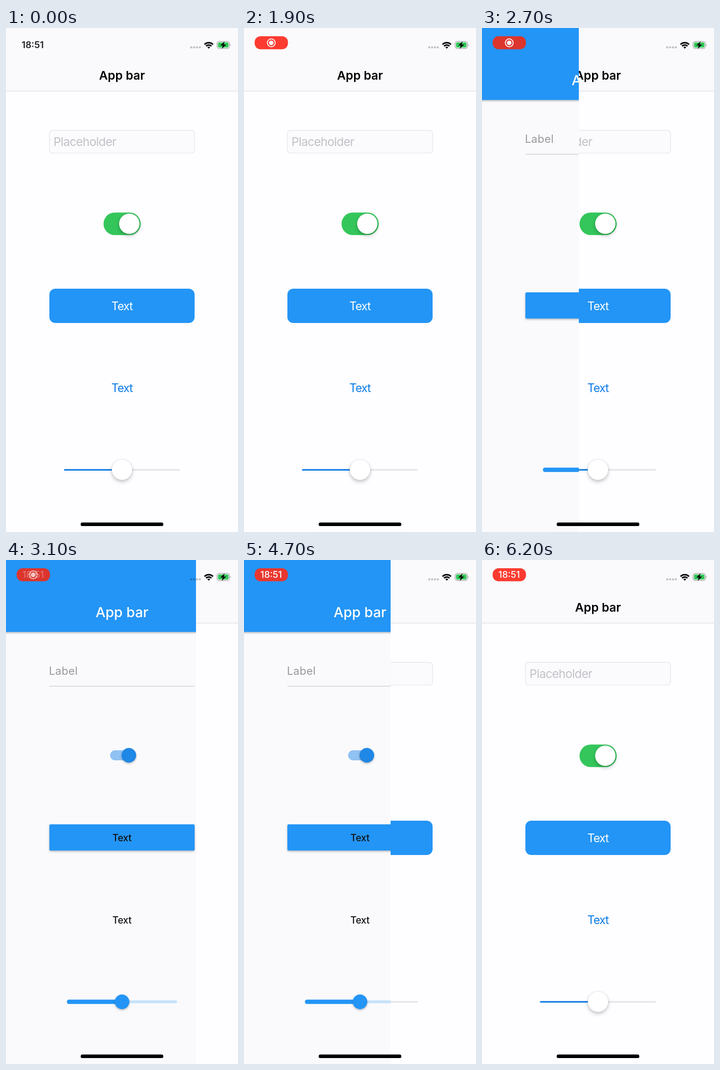
Animation, 508 px wide and 1102 px high, one loop 6300 ms. Source, as an HTML page:

```html
<!DOCTYPE html>
<html lang="en">
<head>
<meta charset="utf-8">
<title>Control styles</title>
<style>
html, body { margin: 0; width: 100%; height: 100%; overflow: hidden; background: #fefdff; }
svg { display: block; width: 100%; height: 100%; font-family: Inter, Roboto, sans-serif; }
.mid { text-anchor: middle; }
.knob { fill: #fff; filter: drop-shadow(0 4px 4px rgba(0,0,0,.2)) drop-shadow(0 0 1px rgba(0,0,0,.18)); }
.raised { filter: drop-shadow(0 2px 2px rgba(0,0,0,.28)); }
.title { font-size: 26.2px; font-weight: 600; }
.action { font-size: 25px; letter-spacing: -1px; }
.bigTitle { font-size: 30.5px; font-weight: 500; fill: #fff; }
.caption { font-size: 20.8px; font-weight: 500; letter-spacing: -.2px; fill: #111; }
.clock { font-size: 20px; font-weight: 600; }
</style>
</head>
<body>
<svg viewBox="0 0 508 1102" preserveAspectRatio="none">
  <clipPath id="wipe"><rect id="edge" width="0" height="1102"/></clipPath>

  <!-- rounded style -->
  <rect width="508" height="1102" fill="#fefdff"/>
  <rect width="508" height="138" fill="#faf9fc"/>
  <rect y="137.5" width="508" height="1.2" fill="#dddce0"/>
  <text class="mid title" x="254" y="112.5">App bar</text>
  <rect x="95" y="223.7" width="318" height="49.8" rx="7" fill="#fbfafd" stroke="#e2e1e5" stroke-width="1.2"/>
  <text x="104" y="258" font-size="26" letter-spacing="-.75" fill="#c3c1c7">Placeholder</text>
  <rect x="213.5" y="403.5" width="81.5" height="49.3" rx="24.6" fill="#34c65b"/>
  <circle class="knob" cx="270" cy="428" r="22.3"/>
  <rect x="95" y="570" width="318" height="75" rx="13" fill="#2395f6"/>
  <text class="mid action" x="254" y="616.5" fill="#fff">Text</text>
  <text class="mid action" x="254" y="795.5" fill="#0a7be6">Text</text>
  <rect x="127" y="964.6" width="254" height="3.2" rx="1.6" fill="#e4e3e7"/>
  <rect x="127" y="964.6" width="127" height="3.2" rx="1.6" fill="#0a7be6"/>
  <circle class="knob" cx="254" cy="966" r="22.3"/>

  <!-- flat style, revealed from the left -->
  <g clip-path="url(#wipe)">
    <rect width="508" height="1102" fill="#fafafd"/>
    <rect class="raised" x="-10" y="-10" width="528" height="167.3" fill="#2395f6"/>
    <text class="mid bigTitle" x="254" y="124.5">App bar</text>
    <text x="94" y="250.5" font-size="24" letter-spacing=".3" fill="#99989d">Label</text>
    <rect x="95" y="275.2" width="318" height="1.4" fill="#cccbd0"/>
    <rect x="228" y="416" width="50" height="22" rx="11" fill="#90c2f3"/>
    <circle class="raised" cx="269" cy="427" r="16" fill="#1f87e6"/>
    <rect class="raised" x="95" y="578" width="318" height="57.3" rx="3" fill="#2395f6"/>
    <text class="mid caption" x="254" y="615">Text</text>
    <text class="mid caption" x="254" y="795">Text</text>
    <rect x="244" y="962.8" width="130.7" height="6.4" rx="3.2" fill="#c8e2fa"/>
    <rect x="133.3" y="961.2" width="121" height="9.6" rx="4.8" fill="#2395f6"/>
    <circle class="raised" cx="254" cy="966" r="16" fill="#2395f6"/>
  </g>

  <!-- status bar -->
  <text id="plain" class="mid clock" x="58.5" y="44" fill="#222125">18:51</text>
  <g id="pill">
    <rect id="pillBox" x="23.3" y="18" width="73" height="28.6" rx="13"/>
    <g id="dot" fill="#fff">
      <circle cx="59.7" cy="32.4" r="8.6" fill="none" stroke="#fff" stroke-width="1.9"/>
      <circle cx="59.7" cy="32.4" r="5"/>
    </g>
    <text id="time" class="mid" x="59.5" y="39.3" font-size="20" font-weight="500" fill="#fff">18:51</text>
  </g>
  <path d="M405.5 42.3h.01M411.8 42.3h.01M418.1 42.3h.01M424.4 42.3h.01" stroke="#000" stroke-opacity=".23" stroke-width="4.8" stroke-linecap="round"/>
  <g fill="none" stroke="#000" stroke-width="3.2">
    <path d="M434.7 36a13.2 13.2 0 0 1 18.6 0"/>
    <path d="M438.1 39.6a8.3 8.3 0 0 1 11.8 0"/>
    <path d="M444 45.2l-3.1-3.1a4.4 4.4 0 0 1 6.2 0z" fill="#000" stroke="none"/>
  </g>
  <rect x="462.2" y="29.4" width="27" height="15.4" rx="4.6" fill="none" stroke="#000" stroke-opacity=".38" stroke-width="1.3"/>
  <path d="M490.8 34.8q2.2 2.3 0 4.6z" opacity=".45"/>
  <rect x="464.2" y="31.4" width="23" height="11.4" rx="2.8" fill="#34c759"/>
  <path d="M478.6 29.2l-9.4 9h5.4l-2 7.2 9.6-9.2h-5.6z"/>
  <rect x="163.5" y="1081.3" width="181" height="7.8" rx="3.9"/>
</svg>
<script>
const LOOP = 6300, STEP = 100, WIDTH = 508, SPEED = 0.51;
const el = id => document.getElementById(id);
const clamp = (v, hi = 1) => Math.max(0, Math.min(hi, v));
const bright = [255, 59, 48], dark = [216, 52, 46];

function draw(t) {
  const reveal = 212 + (t - 2700) * SPEED;
  const retreat = 117 - (t - 5100) * SPEED;
  el('edge').setAttribute('width', clamp(Math.min(reveal, retreat), WIDTH));

  const shown = clamp(t / 400);
  el('plain').style.opacity = 1 - shown;
  el('pill').style.opacity = shown;

  const pulse = 0.5 - 0.5 * Math.cos(2 * Math.PI * (t - 1750) / 2300);
  const rgb = bright.map((c, i) => Math.round(c + (dark[i] - c) * pulse));
  el('pillBox').style.fill = `rgb(${rgb})`;

  const swap = clamp((t - 2950) / 500);
  el('dot').style.opacity = 1 - swap;
  el('time').style.opacity = swap;
}

function tick(now) {
  draw(Math.floor((now + 15) / STEP) * STEP % LOOP);
  requestAnimationFrame(tick);
}
draw(0);
requestAnimationFrame(tick);
</script>
</body>
</html>
```
